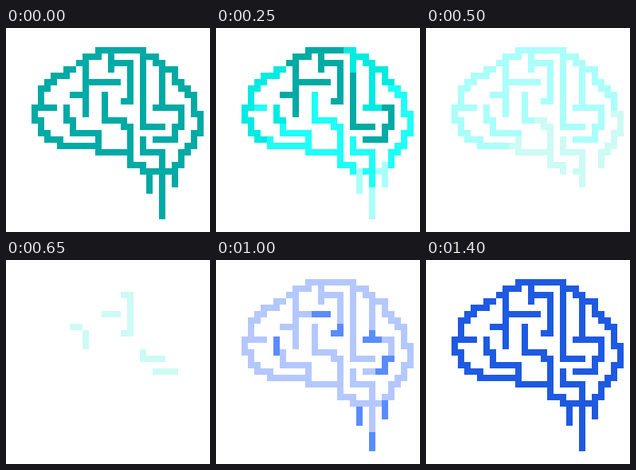
An HTML page with a canvas for the animation above (1500 ms loop, 256 by 256 pixels).

```html
<!DOCTYPE html>
<html lang="en">
<head>
<meta charset="utf-8">
<title>Pixel brain</title>
<style>
  html, body { margin: 0; width: 100%; height: 100%; overflow: hidden; background: #fff; }
  canvas { display: block; width: 100vw; height: 100vh; image-rendering: pixelated; }
</style>
</head>
<body>
<canvas id="stage" width="256" height="256"></canvas>
<script>
const CELL = 8, TICK = 50, TICKS = 30;
const ctx = document.getElementById('stage').getContext('2d');

// Outline first, then the folds, each starting at its free end.
const strokes = `
  M11 5 h1 v-1 h2 v-1 h7 v1 h2 v1 h1 v1 h2 v2 h1 v1 h1 v1 h1 v3 h1 v3 h-1 v2
  h-1 v1 h-1 v2 h-1 v1 h-5 v-1 h-2 v-2 h-5 v-1 h-6 v-1 h-2 v-1 h-1 v-2 h-1
  v-2 h1 v-3 h1 v-1 h1 v-1 h2 v-1 h1
  M12 13 v-9  M17 8 h-5  M10 10 h2  M7 12 h-2
  M16 6 v-3  M18 11 h1 v-6 h-3
  M24 15 h-3 v-12
  M23 12 h1 v-6 v6 h3 v3 h-1  M23 17 h3 v-2
  M9 12 v2 h1 v2 h4 v2
  M15 10 v4 h3 v1 h1 v4
  M21 17 v2 h3
  M24 29 v-10  M22 25 v-3  M26 24 v-2`;

const key = (x, y) => x + ',' + y;
const cells = new Map();
const starts = [];

function trace(path) {
  let x = 0, y = 0;
  const plot = () => cells.set(key(x, y), [x, y]);
  for (const [, op, a, b] of path.matchAll(/([Mhv])(-?\d+)(?: (\d+))?/g)) {
    if (op === 'M') {
      x = +a;
      y = +b;
      starts.push([x, y]);
      plot();
      continue;
    }
    for (let i = Math.abs(a); i > 0; i--) {
      if (op === 'h') x += Math.sign(a); else y += Math.sign(a);
      plot();
    }
  }
}
trace(strokes);

// Arrival of a wave at every cell, given seeds [x, y, delay].
function spread(seeds) {
  const arrival = new Map();
  const queue = [...seeds];
  while (queue.length) {
    const [x, y, d] = queue.shift();
    const k = key(x, y);
    if (!cells.has(k) || arrival.get(k) <= d) continue;
    arrival.set(k, d);
    for (let dx = -1; dx <= 1; dx++) {
      for (let dy = -1; dy <= 1; dy++) {
        if (dx || dy) queue.push([x + dx, y + dy, d + Math.abs(dx) + Math.abs(dy)]);
      }
    }
  }
  return arrival;
}

const delayed = (points, delay) => points.map(([x, y]) => [x, y, delay]);

const ends = starts.slice(1);
const legs = ends.filter(([, y]) => y > 20);
const hook = [18, 11], rightFold = [26, 16], leftFold = [7, 12];

const fade = spread([[24, 28, 0], [22, 25, 0], [26, 24, 0], [...leftFold, 21]]);
const sprout = spread(ends.map(([x, y]) => [x, y, -Math.floor(y / 14)]));
const deepen = spread(delayed([[9, 12], [17, 8], [23, 12], hook, rightFold, ...legs], -2));
const settle = spread([
  ...delayed(ends, -1),
  ...delayed([leftFold, hook, rightFold, [11, 18], [22, 25], [24, 29]], -8)
]);

// A wave leaves its seeds at tick `from` and covers `rate` cells per tick.
const waves = [
  { color: '#00ebe1', arrival: fade, from: 0.6, rate: 8 },
  { color: '#1efff8', arrival: fade, from: 2.2, rate: 8 },
  { color: '#aafffa', arrival: fade, from: 4.65, rate: 10 },
  { color: '#cdfaf5', arrival: fade, from: 8.6, rate: 12 },
  { color: null, arrival: fade, from: 9.75, rate: 13 },
  { color: '#b4c8ff', arrival: sprout, from: 16, rate: 5 },
  { color: '#5a8cff', arrival: deepen, from: 20, rate: 7 },
  { color: '#1e5ae1', arrival: settle, from: 24, rate: 4 }
];

function draw(tick) {
  ctx.fillStyle = '#fff';
  ctx.fillRect(0, 0, 256, 256);
  for (const [k, [x, y]] of cells) {
    let color = '#00aaa5';
    for (const w of waves) {
      if (w.arrival.get(k) <= (tick - w.from) * w.rate) color = w.color;
    }
    if (!color) continue;
    ctx.fillStyle = color;
    ctx.fillRect(x * CELL, y * CELL, CELL, CELL);
  }
}

const start = performance.now();
function frame() {
  draw(Math.floor((performance.now() - start) / TICK) % TICKS);
  requestAnimationFrame(frame);
}
frame();
</script>
</body>
</html>
```
